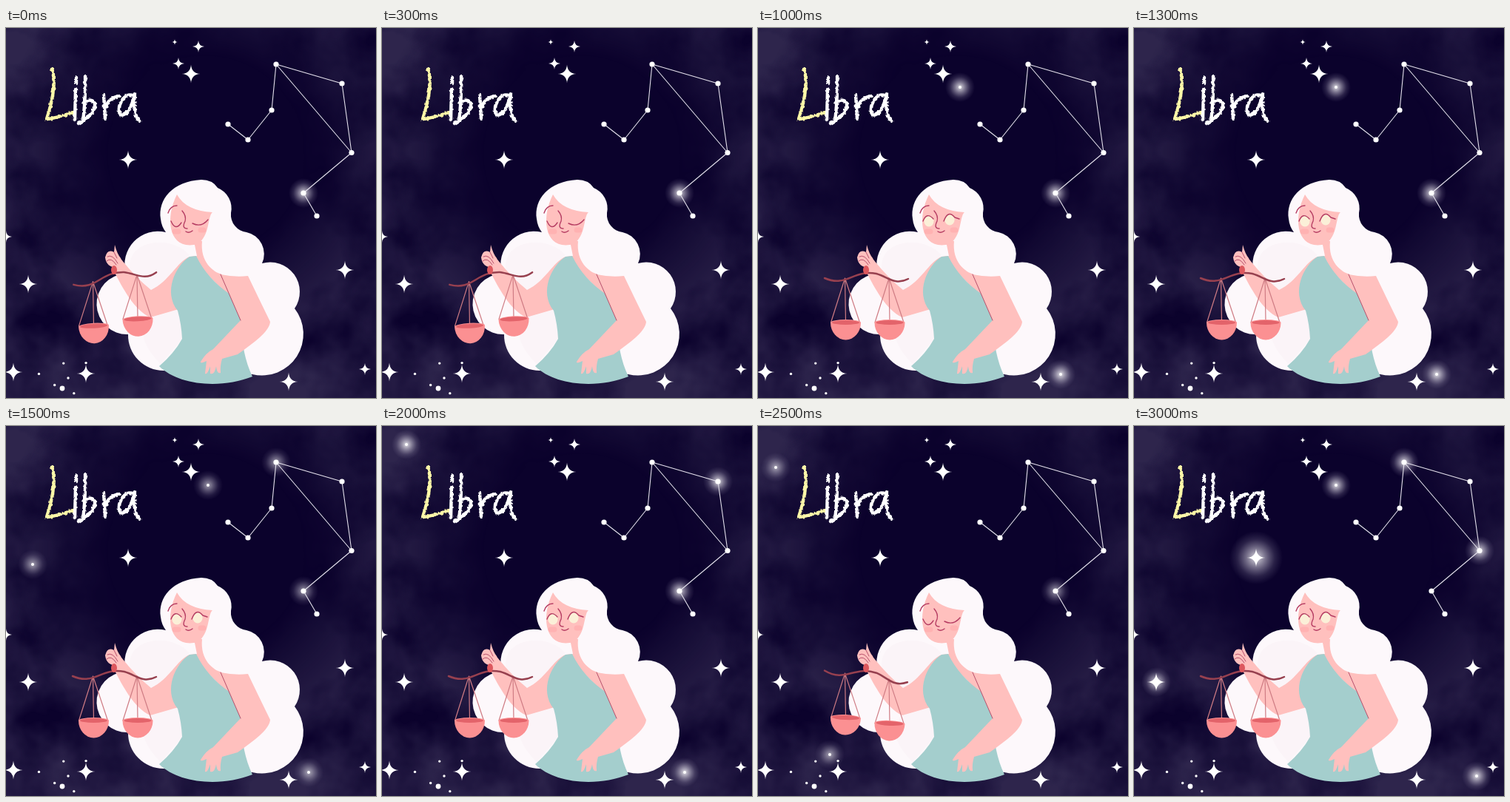
Write an HTML page that moves like this. It is 500x500 px and loops after 3500 ms.

```html
<!DOCTYPE html>
<html lang="en">
<head>
<meta charset="utf-8">
<title>Libra</title>
<style>
  html, body { margin: 0; width: 100%; height: 100%; overflow: hidden; background: #0b022c; }
  svg { display: block; width: 100vw; height: 100vh; }
  .line { fill: none; stroke-linecap: round; stroke-linejoin: round; }
</style>
</head>
<body>
<svg viewBox="0 0 500 500">
  <defs>
    <radialGradient id="halo">
      <stop offset="0" stop-color="#fff" stop-opacity=".95"/>
      <stop offset=".35" stop-color="#e8e4ee" stop-opacity=".55"/>
      <stop offset=".7" stop-color="#c8c2d6" stop-opacity=".18"/>
      <stop offset="1" stop-color="#b0a8c4" stop-opacity="0"/>
    </radialGradient>
    <radialGradient id="clearing" gradientUnits="userSpaceOnUse" cx="270" cy="170" r="330">
      <stop offset=".4" stop-color="#000"/>
      <stop offset=".85" stop-color="#fff"/>
    </radialGradient>
    <mask id="edges"><rect width="500" height="500" fill="url(#clearing)"/></mask>
    <filter id="mist" x="0" y="0" width="100%" height="100%" color-interpolation-filters="sRGB">
      <feTurbulence type="fractalNoise" baseFrequency=".011" numOctaves="4" seed="4"/>
      <feColorMatrix values="0 0 0 0 .18  0 0 0 0 .145  0 0 0 0 .3  2 0 0 0 -.35"/>
    </filter>
    <filter id="chalk" x="-10%" y="-10%" width="120%" height="120%" color-interpolation-filters="sRGB">
      <feTurbulence type="fractalNoise" baseFrequency=".25" numOctaves="2" seed="7"/>
      <feDisplacementMap in="SourceGraphic" scale="4" xChannelSelector="R" yChannelSelector="G"/>
    </filter>
  </defs>

  <g mask="url(#edges)"><rect width="500" height="500" filter="url(#mist)"/></g>
  <g id="glows"></g>
  <g id="sky" fill="#fff"></g>

  <g class="line" filter="url(#chalk)" stroke="#fff" stroke-width="4.4" role="img" aria-label="Libra">
    <path stroke="#fdf8a8" d="M62 55Q70 76 55 123 68 122 90 114"/>
    <path d="M95 67V74M94 83 93 124"/>
    <path d="M107 65Q108 90 104 127M105 101C118 90 134 108 98 129"/>
    <path d="M132 91 134 122M134 108Q139 94 153 92"/>
    <path d="M172 91C158 87 150 106 154 117 162 120 170 108 174 89Q171 118 181 126"/>
  </g>

  <path fill="#fdf8fb" d="M216 276A45 45 0 0 0 162 332A41 41 0 0 0 165 414A48 48 0 0 0 213 463L333 468A56 56 0 0 0 390 379A40 40 0 0 0 346 318A30 30 0 0 0 325 276A24 24 0 0 1 304 250A30 30 0 0 0 286 216Q279 205 264 205C225 207 205 232 209 258Q210 268 216 276Z"/>
  <path fill="#fbf4f8" d="M247 306C225 280 165 284 167 325L198 390Q168 412 209 454L238 420Z"/>

  <g fill="#ffc0be">
    <path d="M231 225Q243 247 279 249C272 255 276 280 259 292 220 302 214 258 231 225Z"/>
    <path d="M254 288H265C262 316 280 330 292 333L303 364 248 309 258 308Z"/>
    <path d="M248 309C231 316 221 342 196 354Q176 338 156 313L145 327C158 352 173 381 195 391L233 380Z"/>
    <path d="M147 293Q150 305 155 311C164 326 136 330 134 310Q137 298 146 303Z"/>
  </g>
  <path fill="#a4cecd" d="M248 309 257 308Q272 339 303 360L318 396Q318 440 333 471C290 488 233 483 207 457Q227 440 238 420 237 400 232 382C212 357 229 321 248 309Z"/>
  <path fill="#ffc0be" d="M290 333Q309 337 327 335 337 356 357 397C356 408 343 420 313 441L292 447Q289 457 290 466 285 468 284 457 282 469 276 467V457Q272 469 269 467L271 450Q262 454 263 451 270 439 280 434L317 395Z"/>
  <path class="line" stroke="#b6506c" d="M290 333 317 395M137 309Q144 305 151 318M136 315Q142 309 149 320M146 303 150 311"/>

  <g class="line" stroke="#b53c62" stroke-width="1.4">
    <path stroke="#ffa9aa" stroke-width="7" opacity=".6" d="M228 275H233M263 273H267"/>
    <path d="M219 250Q222 240 231 240M238 247Q244 254 242 261 237 271 245 271M243 275Q247 278 252 274"/>
    <path id="closed" d="M223 261Q229 275 237 263M252 264Q264 270 273 259"/>
    <g id="open">
      <path stroke="#fbf0d8" stroke-width="13" d="M231 260V262M259 258V260"/>
      <path d="M223 261Q228 248 237 258M251 261Q257 245 266 256L272 258"/>
    </g>
  </g>

  <g id="pans"></g>
  <path id="beam" class="line" stroke="#97404f" stroke-width="2.5" d="M90 338C120 351 128 326 160 332 177 337 185 348 203 339"/>
  <ellipse cx="146" cy="327" rx="4" ry="6" fill="#dd585e"/>
</svg>

<script>
const STEP = 500, SCENES = 7;
const byId = id => document.getElementById(id);
const dot = ([x, y], r) => `<circle cx="${x}" cy="${y}" r="${r}" fill="#fff"/>`;

function sparkle([x, y], r) {
  const q = r * .06;
  return `<path transform="translate(${x} ${y})"
    d="M0-${r}Q${q}-${q} ${r} 0Q${q} ${q} 0 ${r}Q-${q} ${q}-${r} 0Q-${q}-${q} 0-${r}Z"/>` + dot([x, y], r * .18);
}

// The constellation is one chain of stars plus a diagonal.
const chain = [[300, 130], [327, 151], [359, 111], [365, 49], [454, 75], [467, 168.5], [402, 223], [420, 254]];
const [, , , apex, shoulder, corner, anchor] = chain;
const centre = [165, 178], west = [30, 346];
const bigStars = [centre, west, [250, 62], [458, 327], [10, 465], [108, 467], [382, 478]];
const smallStars = [[260, 25], [233, 48], [485, 461], [0, 282]];

// Dust spirals out around a point.
const dust = Array.from({ length: 6 }, (_, i) => {
  const angle = i * 2.4, reach = 8 + i * 6;
  return [76 + reach * Math.cos(angle), 473 + reach * Math.sin(angle)];
});

byId('sky').innerHTML =
  `<path class="line" stroke="#e4e1ec" stroke-width="1.1" d="M${chain.join(' ')}M${apex} ${corner}"/>` +
  chain.map(p => dot(p, 3.6)).join('') +
  bigStars.map(p => sparkle(p, 12.5)).join('') +
  smallStars.map(p => sparkle(p, 8)).join('') + sparkle([228, 19], 4) +
  dust.map(p => dot(p, 1.7)).join('') + dot([76, 487], 3.4);

// Each light: its place and the scenes in which it shines.
const lights = [
  [anchor, '012345'], [apex, '36'], [shoulder, '4'], [corner, '6'], [centre, '6'], [west, '6'],
  [[273, 80], '236'], [[409, 468], '234'], [[53, 212], '1'], [[36, 187], '3'],
  [[33, 25], '4'], [[24, 56], '5'], [[97, 444], '5'], [[463, 473], '6']
];
const fixed = [...chain, ...bigStars];

function glow(place, scene) {
  const r = place === centre ? 36 : 20;
  const strength = scene % 2 ? .65 : .9;
  return `<circle cx="${place[0]}" cy="${place[1]}" r="${r}" fill="url(#halo)" opacity="${strength}"/>` +
    (fixed.includes(place) ? '' : dot(place, 2));
}

const pan = (x, y, lean) => `<g transform="translate(${x} ${y})">
  <path class="line" stroke="#cf7c84" stroke-width="1.2" d="M0 0-19 60M0 0 1 60M0 0 20 60"/>
  <g transform="rotate(${lean} 1 60)">
    <path fill="#fb9092" d="M-19.5 60A20.5 23.5 0 0 0 21.5 60A20.5 4 0 0 0-19.5 60Z"/>
    <ellipse cx="1" cy="60" rx="18.5" ry="3" fill="#e3636a"/>
  </g></g>`;

function show(scene) {
  const awake = scene > 1 && scene !== 5;
  const tilt = awake ? 0 : scene < 2 ? -9 : 7.5;
  const drop = Math.sin(tilt * Math.PI / 180) * 30;
  byId('glows').innerHTML = lights
    .filter(([, scenes]) => scenes.includes(scene))
    .map(([place]) => glow(place, scene)).join('');
  byId('beam').setAttribute('transform', `rotate(${tilt} 147 334)`);
  byId('pans').innerHTML = pan(117.5, 338 - drop, tilt / 3) + pan(177, 338 + drop, tilt / 3);
  byId('open').style.display = awake ? '' : 'none';
  byId('closed').style.display = awake ? 'none' : '';
}

let shown;
function draw(now) {
  const scene = Math.floor(now / STEP) % SCENES;
  if (scene !== shown) show(shown = scene);
  requestAnimationFrame(draw);
}
draw(performance.now());
</script>
</body>
</html>
```
